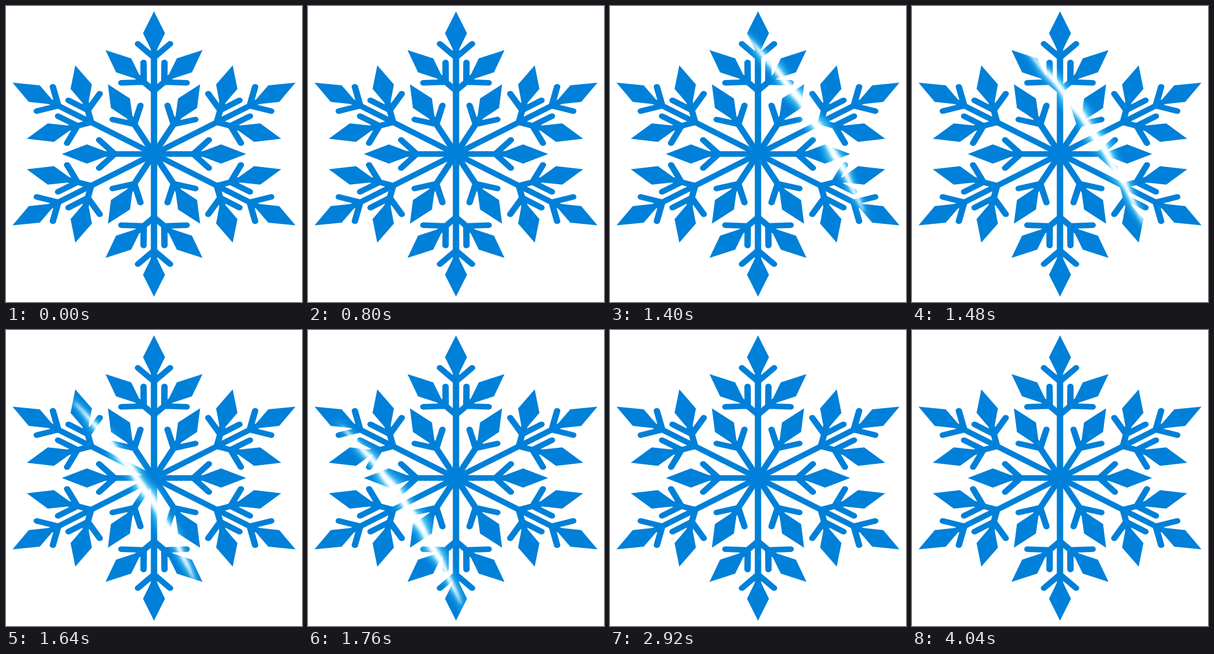
Write an HTML page with a canvas that moves like this. It is 500 px wide and 500 px high and loops after 4.12 s.

```html
<!DOCTYPE html>
<html lang="en">
<head>
<meta charset="utf-8">
<title>Snowflake</title>
<style>
html, body { margin: 0; width: 100%; height: 100%; overflow: hidden; background: #fff; }
canvas { display: block; width: 500px; height: 500px; }
</style>
</head>
<body>
<canvas id="stage" width="500" height="500"></canvas>
<script>
const ctx = document.getElementById('stage').getContext('2d');
const LOOP = 4120, STEP = 40;
const BLUE = '#0080d8', CYAN = '#5fdcff', WHITE = '#fff';
const STRETCH = 1.145;
const rad = deg => deg * Math.PI / 180;

// Stem, two barbs and a diamond head, pointing up from the origin.
function twig(tip) {
  ctx.beginPath();
  ctx.moveTo(0, 0);
  ctx.lineTo(0, 62 - tip);
  ctx.moveTo(-23.7, 55 - tip);
  ctx.lineTo(0, 78 - tip);
  ctx.lineTo(23.7, 55 - tip);
  ctx.stroke();
  ctx.beginPath();
  ctx.moveTo(0, -tip);
  ctx.lineTo(16.2, 37 - tip);
  ctx.lineTo(0, 75 - tip);
  ctx.lineTo(-16.2, 37 - tip);
  ctx.fill();
}

function flake() {
  ctx.save();
  ctx.translate(250, 250);
  ctx.scale(STRETCH, 1);
  ctx.fillStyle = ctx.strokeStyle = BLUE;
  ctx.lineWidth = 9.4;
  ctx.lineCap = 'round';
  for (let i = 0; i < 6; i++) {
    twig(241);
    for (const side of [-1, 1]) {
      ctx.save();
      ctx.translate(0, -107);
      ctx.rotate(side * rad(46.3));
      twig(99);
      ctx.restore();
    }
    ctx.rotate(rad(30));
    twig(136);
    ctx.rotate(rad(30));
  }
  ctx.restore();
}

// Bowed, tapering streak along the local x axis.
function streak(half, thick, color, blur, alpha) {
  const edge = side => x => {
    const taper = 1 - (x / half) ** 2;
    const ripple = 1 + 0.25 * Math.sin(x / 11 + side);
    return 0.0005 * x * x + side * (1 + thick * taper * ripple);
  };
  const top = edge(-1), bottom = edge(1);
  ctx.filter = `blur(${blur}px)`;
  ctx.globalAlpha = alpha;
  ctx.fillStyle = color;
  ctx.beginPath();
  for (let x = -half; x <= half; x += 5) ctx.lineTo(x, top(x));
  for (let x = half; x >= -half; x -= 5) ctx.lineTo(x, bottom(x));
  ctx.fill();
}

function glint(t) {
  const dt = t - 1280;
  const dist = 172 - 0.505 * dt - 0.000108 * dt * dt;
  if (Math.abs(dist) > 330) return;
  ctx.save();
  ctx.globalCompositeOperation = 'source-atop';
  ctx.translate(250, 250);
  ctx.rotate(rad(56));
  ctx.translate(0, -dist);
  streak(195, 13, CYAN, 6, 0.85);
  streak(180, 5.5, WHITE, 2.5, 1);
  ctx.restore();
}

function draw(now) {
  const t = Math.floor((now % LOOP) / STEP) * STEP;
  ctx.clearRect(0, 0, 500, 500);
  flake();
  if (t > 900 && t <= 2280) glint(t);
}

const start = performance.now();
function tick() {
  draw(performance.now() - start);
  requestAnimationFrame(tick);
}
tick();
</script>
</body>
</html>
```
